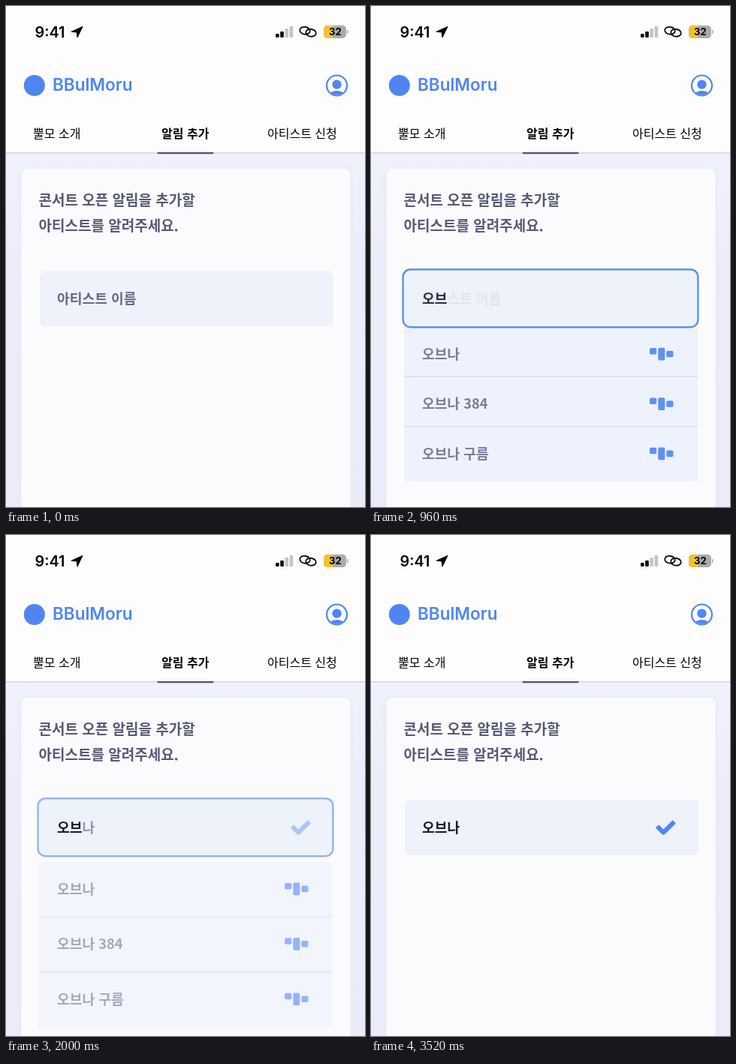
An HTML page that plays this animation: 478x668 px, repeating every 3600 ms.

```html
<!DOCTYPE html>
<html lang="ko">
<head>
<meta charset="utf-8">
<style>
  html, body { margin: 0; height: 100%; overflow: hidden; background: #fdfdfe; }
  svg { display: block; width: 100vw; height: 100vh; }
  text { font: 600 18.2px "Noto Sans CJK KR", "Noto Sans CJK", sans-serif; }
  .tab { font-size: 16px; font-weight: 400; }
  .title { font-size: 19px; fill: #565a74; }
  .latin { font-family: Inter, sans-serif; }
  .row text { fill: #6b6f8e; }
</style>
</head>
<body>
<svg viewBox="0 0 478 668">
  <defs>
    <linearGradient id="page" x2="0" y2="1">
      <stop stop-color="#eff2fc"/>
      <stop offset=".3" stop-color="#ebeefa"/>
      <stop offset="1" stop-color="#eaecf9"/>
    </linearGradient>
    <filter id="soft" x="-10%" y="-10%" width="120%" height="120%"><feGaussianBlur stdDeviation="3"/></filter>
    <clipPath id="face"><circle cx="440.5" cy="106" r="12.5"/></clipPath>
    <clipPath id="cell"><rect x="423" y="26" width="30" height="17" rx="5"/></clipPath>
  </defs>

  <rect width="478" height="668" fill="#fdfdfe"/>
  <rect y="196" width="478" height="472" fill="url(#page)"/>
  <rect y="195" width="478" height="1.6" fill="#d5d9e8"/>
  <rect x="201.5" y="195" width="75" height="2.3" rx="1" fill="#4d5271"/>

  <!-- status bar -->
  <text class="latin" x="38.5" y="41.5" style="font-size:19.8px">9:41</text>
  <path d="M102 27.5 87 34.3 94.2 35 95 42Z" stroke="#000" stroke-linejoin="round"/>
  <g id="signal"></g>
  <g fill="none" stroke="#111" stroke-width="1.9">
    <ellipse cx="398" cy="32.8" rx="6.8" ry="4.9" transform="rotate(8 398 32.8)"/>
    <ellipse cx="406" cy="35.8" rx="6.8" ry="4.9" transform="rotate(8 406 35.8)"/>
  </g>
  <g clip-path="url(#cell)">
    <rect x="423" y="26" width="30" height="17" fill="#aaaaac"/>
    <rect x="423" y="26" width="12.5" height="17" fill="#f1c232"/>
  </g>
  <rect x="454" y="32" width="1.6" height="5" rx="0.8" fill="#aaaaac"/>
  <text class="latin" x="438.3" y="39.2" text-anchor="middle" style="font-size:13px;font-weight:700">32</text>

  <!-- header -->
  <g fill="#4f85f3">
    <circle cx="37.8" cy="106" r="14"/>
    <text class="latin" x="62" y="113" style="font-size:22.5px">BBulMoru</text>
    <circle cx="440.5" cy="106" r="13.5" fill="none" stroke="#4f85f3" stroke-width="2.2"/>
    <circle cx="440.5" cy="104.6" r="6.2"/>
    <ellipse cx="440.5" cy="118.5" rx="9.5" ry="5.5" clip-path="url(#face)"/>
  </g>
  <text class="tab" x="36" y="175.5">뿔모 소개</text>
  <text class="tab" x="207" y="175.5" style="font-weight:700">알림 추가</text>
  <text class="tab" x="348" y="175.5">아티스트 신청</text>

  <!-- card -->
  <rect x="20" y="217" width="439" height="480" rx="9" fill="#e3e7f5" filter="url(#soft)"/>
  <rect x="20.5" y="217" width="438" height="480" rx="8" fill="#fbfbfe"/>
  <text class="title" x="43.5" y="265.7">콘서트 오픈 알림을 추가할</text>
  <text class="title" x="43.5" y="300">아티스트를 알려주세요.</text>

  <g id="list"></g>
  <rect x="45" y="353" width="391" height="74" rx="7" fill="#edf2fb"/>
  <rect id="focus" x="42.6" y="351.2" width="392.8" height="77" rx="10" fill="#edf2fc" stroke="#4f85ee" stroke-width="2.4"/>
  <text id="hint" x="68" y="396.7" fill="#666a87">아티스트 이름</text>
  <text id="typed" x="68" y="396.7" fill="#17182e">오브<tspan id="last">나</tspan></text>
  <path id="check" d="M381 388.3 389.3 396.6 403.8 382.3" fill="none" stroke="#4f85f6" stroke-width="6" stroke-linejoin="round"/>
</svg>
<script>
  const LOOP = 3600, OPEN_AT = 650, PICK_AT = 1890, RATE = 0.0127;
  const REST_Y = 390, FIRST_Y = 472.2, PITCH = 73.4;
  const el = id => document.getElementById(id);

  el("signal").innerHTML = [5, 8, 12, 15].map((h, i) =>
    `<rect x="${359 + i * 6.2}" y="${42 - h}" width="4.6" height="${h}" rx="1.2" fill="${i < 2 ? "#000" : "#c4c4c6"}"/>`).join("");

  el("list").innerHTML = ["오브나", "오브나 384", "오브나 구름"].map((name, i) => `
    <g class="row">
      <rect x="44" y="-36.7" width="391" height="73.4" fill="#edf2fc"/>
      ${i ? '<rect x="44" y="-37.3" width="391" height="1.4" fill="#d3d9eb"/>' : ""}
      <text x="68" y="6.7">${name}</text>
      <g fill="#4f85f3">
        <rect x="371" y="-8.3" width="9.2" height="8.5" rx="2"/>
        <rect x="382.3" y="-8.6" width="9" height="16.8" rx="2"/>
        <rect x="393.3" y="-4.6" width="9.2" height="8.6" rx="2"/>
      </g>
    </g>`).join("");
  const rows = [...document.querySelectorAll(".row")];

  // Critically damped spring from 0 to 1
  function spring(ms) {
    const x = Math.max(0, ms) * RATE;
    return 1 - (1 + x) * Math.exp(-x);
  }

  function draw() {
    const t = performance.now() % LOOP;
    const open = spring(t - OPEN_AT), pick = spring(t - PICK_AT);
    const shown = open * (1 - pick);
    rows.forEach((row, i) => {
      const y = REST_Y + (FIRST_Y + i * PITCH - REST_Y) * open;
      row.setAttribute("transform", `translate(0 ${y})`);
    });
    el("list").style.opacity = el("focus").style.opacity = shown;
    el("hint").style.opacity = 1 - open;
    el("typed").style.opacity = open;
    el("last").style.fillOpacity = el("check").style.opacity = pick;
    requestAnimationFrame(draw);
  }
  draw();
</script>
</body>
</html>
```
